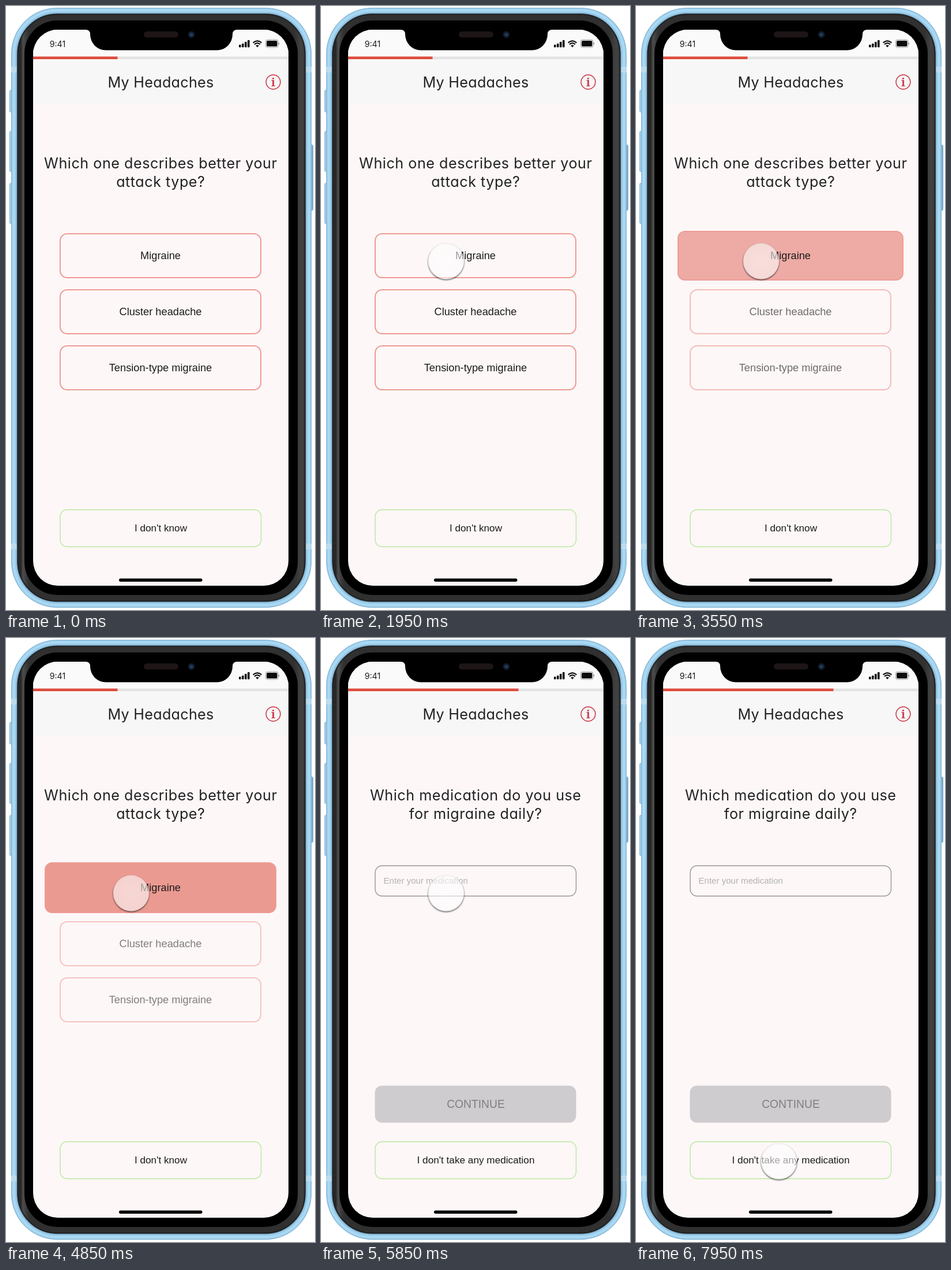
Animation of 536x1045 px, one loop 8 s. Source, as an HTML page:

```html
<!DOCTYPE html>
<html lang="en">
<head>
<meta charset="utf-8">
<title>My Headaches</title>
<style>
  html, body { margin: 0; width: 100%; height: 100%; overflow: hidden; background: #fff; }
  svg { display: block; width: 536px; height: 1045px; }
  text { font-family: "Liberation Sans", Arial, sans-serif; font-size: 18.25px; fill: #1c1a1a; text-anchor: middle; }
  .head { font-family: Inter, sans-serif; font-size: 25.2px; letter-spacing: .01em; font-feature-settings: "cv11"; fill: #222; }
  .ask { letter-spacing: .02em; }
  .small { font-size: 17.2px; }
  .choice { fill: none; stroke: #ee9b94; stroke-width: 2; }
</style>
</head>
<body>
<svg viewBox="0 0 536 1045" xmlns="http://www.w3.org/2000/svg">
  <defs>
    <linearGradient id="rim">
      <stop offset="0" stop-color="#2c2c2c"/>
      <stop offset=".012" stop-color="#262626"/>
      <stop offset=".02" stop-color="#4c4c4c"/>
      <stop offset=".04" stop-color="#303030"/>
      <stop offset=".96" stop-color="#303030"/>
      <stop offset=".985" stop-color="#424242"/>
      <stop offset="1" stop-color="#383838"/>
    </linearGradient>
    <radialGradient id="touch">
      <stop offset="0" stop-color="#fff" stop-opacity=".6"/>
      <stop offset=".9" stop-color="#fcfcfc" stop-opacity=".58"/>
      <stop offset="1" stop-color="#f2f2f2" stop-opacity=".6"/>
    </radialGradient>
    <filter id="soft" x="-20%" y="-20%" width="140%" height="140%"><feGaussianBlur stdDeviation="1.3"/></filter>
    <mask id="ring" maskUnits="userSpaceOnUse" x="-45" y="-45" width="90" height="90">
      <rect x="-45" y="-45" width="90" height="90" fill="#fff"/>
      <circle r="31" fill="#000"/>
    </mask>
    <clipPath id="screen"><rect x="47" y="41" width="443" height="962" rx="43"/></clipPath>
  </defs>

  <!-- phone body -->
  <g fill="#a9cfe6" stroke="#82aecb">
    <rect x="6.5" y="145.5" width="6" height="38" rx="2"/>
    <rect x="6.5" y="216.5" width="6" height="70" rx="2"/>
    <rect x="6.5" y="306.5" width="6" height="70" rx="2"/>
    <rect x="526.5" y="240.5" width="6" height="113" rx="2" fill="#86b3d0" stroke="#6e9ab8"/>
  </g>
  <rect x="9.5" y="3.5" width="520" height="1037" rx="79" fill="#94c6e5" stroke="#7fb2d3"/>
  <rect x="13.5" y="7.5" width="512" height="1029" rx="75" fill="none" stroke="#a9d8f3" stroke-width="5"/>
  <g fill="#c5e0ef" opacity=".7">
    <rect x="9" y="105" width="12" height="10"/><rect x="518" y="105" width="12" height="10"/>
    <rect x="9" y="930" width="12" height="10"/><rect x="518" y="930" width="12" height="10"/>
  </g>
  <rect x="18.5" y="12.5" width="502" height="1019" rx="70" fill="#6c9cbc"/>
  <rect x="19.5" y="13.5" width="500" height="1017" rx="69" fill="url(#rim)"/>
  <rect x="20.5" y="14.5" width="498" height="1015" rx="68" fill="none" stroke="#222" stroke-width="2"/>
  <rect x="32" y="25" width="474" height="994" rx="57" fill="#000"/>

  <g clip-path="url(#screen)">
    <rect x="47" y="41" width="443" height="962" fill="#fdf7f7"/>
    <rect x="47" y="41" width="443" height="129" fill="#f7f7f7"/>
    <rect x="47" y="41" width="443" height="47" fill="#fafafa"/>
    <rect x="47" y="87.5" width="443" height="4.5" fill="#e3e3e3"/>
    <rect id="bar" x="47" y="87.5" width="146.5" height="4.5" fill="#de4a3d"/>

    <text class="head" x="268.5" y="141">My Headaches</text>
    <circle cx="463.5" cy="131.5" r="12.4" fill="none" stroke="#cf4351" stroke-width="1.7"/>
    <text x="463.5" y="138.7" style="font:700 20px 'Noto Serif',serif;fill:#cf4351">i</text>

    <g id="pageA">
      <text class="head ask" x="268.3" y="281">Which one describes better your</text>
      <text class="head ask" x="268.3" y="312.5">attack type?</text>
      <rect id="pick" rx="12" stroke="#ee9b94" stroke-width="2" fill="#eb9a92"/>
      <text x="268" y="438">Migraine</text>
      <g id="others">
        <rect class="choice" x="94" y="491" width="348" height="76" rx="12"/>
        <text x="268" y="535">Cluster headache</text>
        <rect class="choice" x="94" y="588" width="348" height="76" rx="12"/>
        <text x="268" y="632">Tension-type migraine</text>
      </g>
      <text class="small" x="268.5" y="909">I don't know</text>
    </g>

    <g id="pageB" opacity="0">
      <text class="head ask" x="268.3" y="281">Which medication do you use</text>
      <text class="head ask" x="268.3" y="312.5">for migraine daily?</text>
      <rect x="94" y="394" width="348.5" height="52.5" rx="12" fill="none" stroke="#999596" stroke-width="1.4"/>
      <text x="108.5" y="425" style="font-size:15.05px;text-anchor:start;fill:#b5b1b1">Enter your medication</text>
      <rect x="93.5" y="774.5" width="349" height="64" rx="12" fill="#cfccd0"/>
      <text x="268.5" y="813" style="font-size:19.3px;fill:#827d7f">CONTINUE</text>
      <text class="small" x="268.5" y="909">I don't take any medication</text>
    </g>

    <rect x="94" y="871.5" width="348.5" height="64" rx="12" fill="none" stroke="#b6e99c" stroke-width="1.4"/>
    <rect x="196" y="990.5" width="144.5" height="5.5" rx="2.75" fill="#000"/>
  </g>

  <!-- notch and status bar -->
  <path d="M138 40V41Q146 41 146 49A27 27.5 0 0 0 173 76.5H366A27 27.5 0 0 0 393 49Q393 41 401 41V40Z" fill="#000"/>
  <rect x="239" y="44" width="60" height="10.5" rx="5.25" fill="#1e1516"/>
  <circle cx="321.5" cy="49.5" r="6" fill="#101a28"/>
  <circle cx="321.5" cy="49.5" r="3" fill="#223d5c"/>
  <text x="89.5" y="71" style="font:14.2px Inter,sans-serif">9:41</text>
  <g fill="#0b0b0b">
    <rect x="404" y="67" width="3.6" height="4.5" rx="1"/>
    <rect x="409" y="65" width="3.6" height="6.5" rx="1"/>
    <rect x="414" y="62" width="3.6" height="9.5" rx="1"/>
    <rect x="419" y="59" width="3.6" height="12.5" rx="1"/>
    <path d="M436 71.5L433.2 68.6Q436 66.3 438.8 68.6Z"/>
    <rect x="452" y="60" width="18.5" height="10" rx="2"/>
    <path d="M473 63Q475.5 65 473 67Z" opacity=".5"/>
  </g>
  <g fill="none" stroke="#0b0b0b">
    <path d="M428.7 63.6Q436 57 443.3 63.6M431.1 66.4Q436 62 440.9 66.4" stroke-width="2.1"/>
    <rect x="450.3" y="58.3" width="21.9" height="13.4" rx="3.5" stroke-opacity=".4"/>
  </g>

  <g id="cursor">
    <g mask="url(#ring)"><circle cy="1.4" r="31.5" fill="#000" opacity=".55" filter="url(#soft)"/></g>
    <circle r="31.2" fill="url(#touch)"/>
  </g>
</svg>

<script>
  const LOOP = 8000;
  const el = id => document.getElementById(id);
  const set = (id, attrs) => {
    for (const name in attrs) el(id).setAttribute(name, attrs[name]);
  };
  const mix = (a, b, p) => a + (b - a) * p;
  const span = (t, from, to) => Math.min(1, Math.max(0, (t - from) / (to - from)));
  const easeOut = p => 1 - (1 - p) ** 3;
  const smooth = p => p * p * (3 - 2 * p);

  // time, x, y, easing towards this point
  const path = [
    [0, 600, 520],
    [450, 480, 468],
    [800, 350, 440],
    [1000, 312.5, 436],
    [1900, 217, 441.5, easeOut],
    [6650, 217, 441.5],
    [7900, 248, 905.5, smooth]
  ];

  function cursorAt(t) {
    const i = path.findIndex(point => point[0] > t);
    if (i < 0) return path[path.length - 1].slice(1, 3);
    const [t0, x0, y0] = path[i - 1];
    const [t1, x1, y1, ease = p => p] = path[i];
    const p = ease(span(t, t0, t1));
    return [mix(x0, x1, p), mix(y0, y1, p)];
  }

  function draw(t) {
    const chosen = easeOut(span(t, 3150, 4100));
    const next = easeOut(span(t, 4870, 5850));
    const x = mix(94, 68, chosen);
    const y = mix(394, 389, chosen);

    set('pick', {
      x, y, width: 536 - 2 * x, height: 864 - 2 * y,
      'fill-opacity': chosen
    });
    set('others', { opacity: mix(1, 0.55, chosen) });
    set('pageA', { opacity: 1 - next });
    set('pageB', { opacity: next });
    set('bar', { width: mix(146.5, 295.5, next) });
    set('cursor', { transform: `translate(${cursorAt(t)})` });
  }

  function tick() {
    draw(performance.now() % LOOP);
    requestAnimationFrame(tick);
  }
  tick();
</script>
</body>
</html>
```
